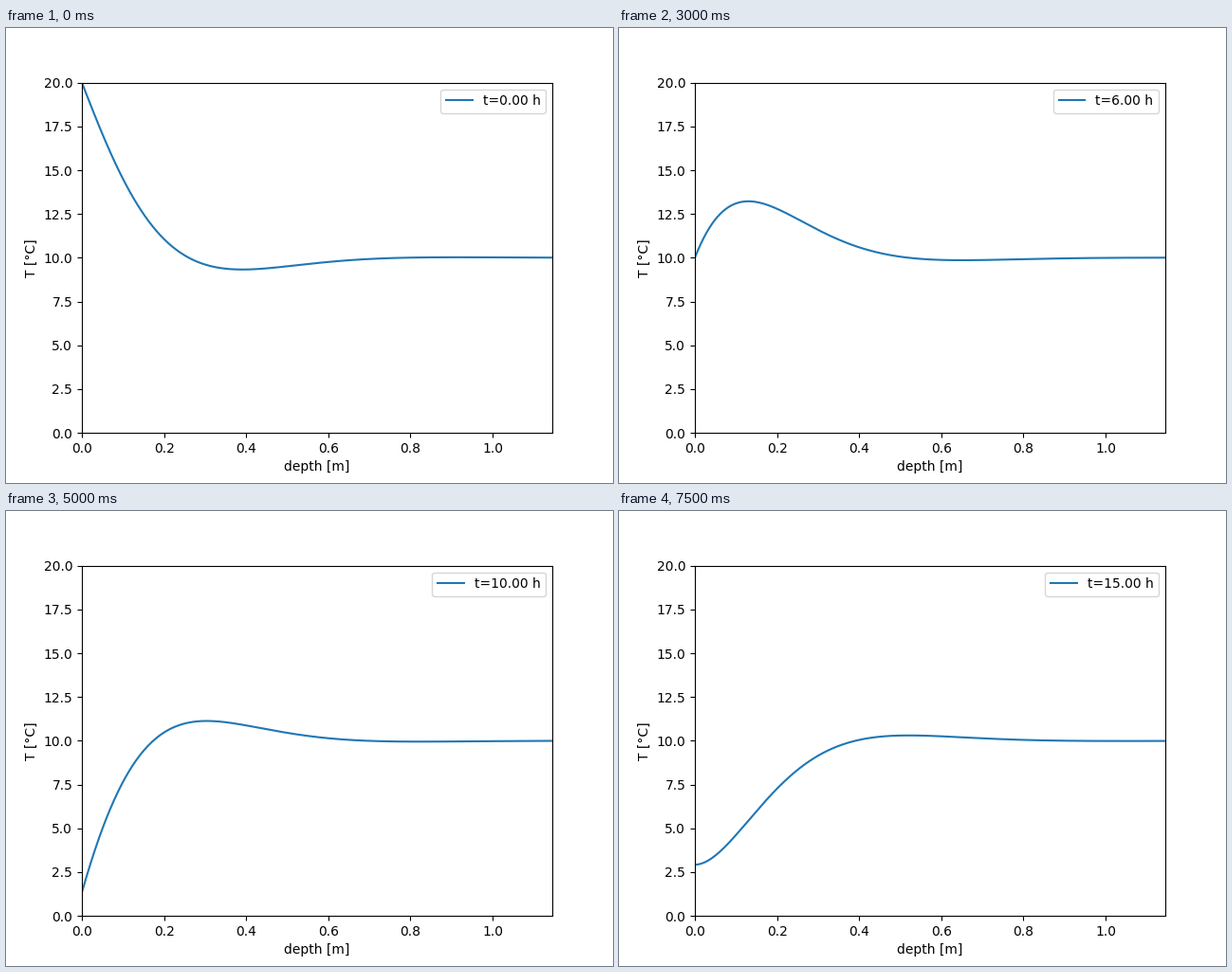
Animation of 640x480 px, one loop 8000 ms. Source, as a matplotlib script:

```python
import numpy as np
import matplotlib.pyplot as plt
from matplotlib.animation import FuncAnimation

HOURS = 16
T_MEAN, T_AMP = 10.0, 10.0      # °C
DIFFUSIVITY = 1e-6              # m²/s
OMEGA = 2 * np.pi / (24 * 3600)

# Penetration depth, and the depth where the wave has faded to 1/1000
damping = np.sqrt(2 * DIFFUSIVITY / OMEGA)
z_max = damping * np.log(1000)
z = np.linspace(0, z_max, 500)


def temperature(hours):
    phase = OMEGA * hours * 3600 - z / damping
    return T_MEAN + T_AMP * np.exp(-z / damping) * np.cos(phase)


fig, ax = plt.subplots(figsize=(6.4, 4.8), dpi=100)
line, = ax.plot(z, temperature(0), label="t=0.00 h")
ax.set_xlim(0, z_max)
ax.set_ylim(0, 20)
ax.set_xlabel("depth [m]")
ax.set_ylabel("T [°C]")
label = ax.legend(loc="upper right").get_texts()[0]


def update(hour):
    line.set_ydata(temperature(hour))
    label.set_text(f"t={hour:.2f} h")
    return line, label


anim = FuncAnimation(fig, update, frames=HOURS, interval=500,
                     repeat=True, repeat_delay=0, blit=False)
plt.show()
```
